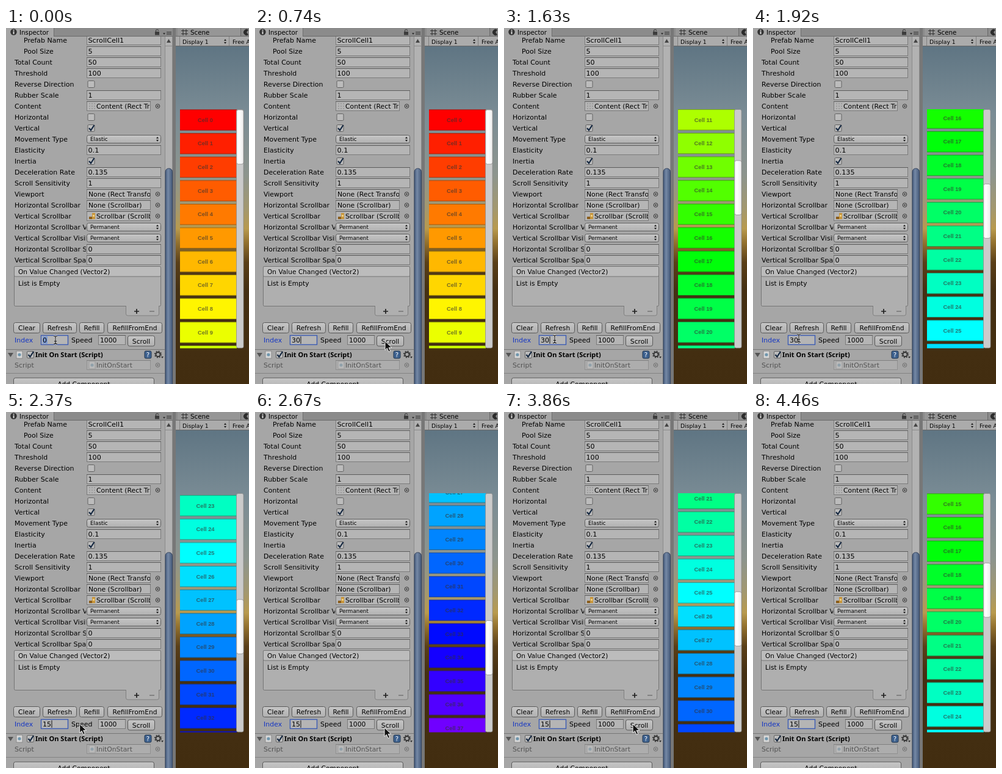
Recreate the animation shown at these times as an HTML page. Size 398 px wide and 583 px high, loop 4.91 s.

```html
<!DOCTYPE html>
<html lang="en">
<head>
<meta charset="utf-8">
<title>Inspector scroll</title>
<style>
html, body { margin: 0; width: 100%; height: 100%; overflow: hidden; background: #a6a6a6; }
svg { display: block; font: 11px "DejaVu Sans", sans-serif; }
text { white-space: pre; }
.bold { font: bold 11px "Noto Sans", sans-serif; }
.cell { font: bold 9.3px "Liberation Sans", Arial, sans-serif; fill: #323232; fill-opacity: .66; }
</style>
</head>
<body>
<svg id="stage" width="398" height="583" viewBox="0 0 398 583"></svg>
<script>
const LOOP = 4910, PITCH = 38.65, TOP = 133.5;
const stage = document.getElementById('stage');

const rect = (x, y, w, h, fill, more = '') =>
  `<rect x="${x}" y="${y}" width="${w}" height="${h}" fill="${fill}" ${more}/>`;
const path = (d, fill, more = '') => `<path d="${d}" fill="${fill}" ${more}/>`;
const line = (d, color, width = 1) =>
  path(d, 'none', `stroke="${color}" stroke-width="${width}"`);
const text = (x, y, s, size = 11, more = '') =>
  `<text x="${x}" y="${y}" font-size="${size}" ${more}>${s}</text>`;
const mid = 'text-anchor="middle"';

const field = (x, y, w, fill = '#b5b5b5') =>
  rect(x + .5, y - 7.5, w - 1, 15, fill, 'stroke="#7b7b7b"') +
  line(`M${x} ${y - 7.5}h${w}`, '#5c5c5c');
const button = (x, y, w, label, h = 17) =>
  rect(x + .5, y - h / 2, w - 1, h, 'url(#face)', 'rx="3" stroke="#5a5a5a"') +
  text(x + w / 2, y + 4, label, 10.7, mid);
const check = (x, y, on) =>
  rect(x - 5.5, y - 5.5, 11, 11, '#bcbcbc', 'rx="1.5" stroke="#626262"') +
  (on ? line(`M${x - 3.5} ${y}l3 3.5 5.5-8.5`, '#13263f', 2.2) : '');
const picker = (y, color = '#333') =>
  `<circle cx="248.5" cy="${y}" r="3.3" fill="none" stroke="${color}"/>` +
  `<circle cx="248.5" cy="${y}" r="1.2" fill="${color}"/>`;
const updown = (x, y) =>
  path(`M${x - 2} ${y - 1}l2-3 2 3zM${x - 2} ${y + 1}l2 3 2-3z`, '#222');
const popup = (y, s) =>
  rect(132.5, y - 6.5, 121, 13, 'url(#face)', 'rx="3" stroke="#5f5f5f"') +
  text(138, y + 3.2, s, 8.8) + updown(248, y);
const gridIcon = (x, y) => line(
  `M${x} ${y - 4}h10M${x} ${y}h10M${x} ${y + 4}h10`, '#858585') .replace('/>', ' stroke-dasharray="2 2"/>');
const barIcon = (x, y) =>
  rect(x, y + 1, 5, 4, '#8a5d1c') + rect(x + 5, y - 5, 5, 10, '#c8963c') +
  rect(x + 6, y - 2, 3, 3, '#f0d080');
const scriptIcon = (x, y, opacity) =>
  `<g opacity="${opacity}">` + rect(x, y - 6, 10, 12, '#d6d6d6', 'stroke="#8a8a8a"') +
  `<circle cx="${x + 5}" cy="${y}" r="2.6" fill="#6f96ad"/></g>`;

// label, kind, value
const rows = [
  ['Prefab Name', 'num', 'ScrollCell1'], ['Pool Size', 'num', '5'],
  ['Total Count', 'num', '50'], ['Threshold', 'num', '100'],
  ['Reverse Direction', 'check', false], ['Rubber Scale', 'num', '1'],
  ['Content', 'grid', 'Content (Rect Transform)'], ['Horizontal', 'check', false],
  ['Vertical', 'check', true], ['Movement Type', 'popup', 'Elastic'],
  ['Elasticity', 'num', '0.1'], ['Inertia', 'check', true],
  ['Deceleration Rate', 'num', '0.135'], ['Scroll Sensitivity', 'num', '1'],
  ['Viewport', 'obj', 'None (Rect Transform)'],
  ['Horizontal Scrollbar', 'obj', 'None (Scrollbar)'],
  ['Vertical Scrollbar', 'bar', 'Scrollbar (Scrollbar)'],
  ['Horizontal Scrollbar Visibility', 'popup', 'Permanent'],
  ['Vertical Scrollbar Visibility', 'popup', 'Permanent'],
  ['Horizontal Scrollbar Spacing', 'num', '0'],
  ['Vertical Scrollbar Spacing', 'num', '0']
];

function row([label, kind, value], i) {
  const y = 20 + 18 * i;
  let s = text(i < 2 ? 29 : 14, y + 4, label, 11, 'clip-path="url(#labels)"');
  if (kind === 'check') return s + check(139.5, y, value);
  if (kind === 'popup') return s + popup(y, value);
  if (kind === 'num') return s + field(132, y, 122) + text(134.5, y + 4, value, 11.2);
  const icon = { grid: gridIcon, bar: barIcon }[kind];
  return s + field(132, y, 105) + (icon ? icon(136, y) : '') +
    text(icon ? 148 : 135, y + 4, value, 10.8, 'clip-path="url(#values)"') + picker(y);
}

function rainbow(p) {
  const i = Math.floor(p * 6), f = p * 6 - i, q = 1 - f;
  const c = [[1, f, 0], [q, 1, 0], [0, 1, f], [0, q, 1], [f, 0, 1], [1, 0, q]][i % 6];
  return `rgb(${c.map(v => Math.round(v * 255))})`;
}

function cell(_, i) {
  const y = TOP + i * PITCH;
  return rect(285, y, 93, 34.2, rainbow(i / 50)) +
    line(`M285 ${y + .4}h93M285 ${y + 33.8}h93`, 'rgba(40,40,20,.45)', .9) +
    text(326.5, y + 20.3, 'Cell ' + i, 9.3, mid + ' class="cell"');
}

const defs = `<defs>
<clipPath id="labels"><rect width="131" height="583"/></clipPath>
<clipPath id="values"><rect x="132" width="104" height="583"/></clipPath>
<clipPath id="view"><rect x="285" y="133" width="93" height="391.5"/></clipPath>
<linearGradient id="face" x2="0" y2="1"><stop stop-color="#c6c6c6"/><stop offset="1" stop-color="#b0b0b0"/></linearGradient>
<linearGradient id="thumb"><stop stop-color="#465b7c"/><stop offset=".4" stop-color="#7488a5"/><stop offset="1" stop-color="#465a79"/></linearGradient>
<linearGradient id="knob"><stop stop-color="#e8e8e8"/><stop offset=".3" stop-color="#fff"/><stop offset="1" stop-color="#ededed"/></linearGradient>
<linearGradient id="sky" gradientUnits="userSpaceOnUse" x1="0" y1="30" x2="0" y2="583">
${[[0, '#5f7583'], [.2, '#7a8c95'], [.38, '#8d958e'], [.48, '#a3986f'], [.54, '#b89a4e'],
   [.58, '#94722f'], [.64, '#5a3f18'], [.72, '#453013'], [1, '#422d10']]
  .map(([o, c]) => `<stop offset="${o}" stop-color="${c}"/>`).join('')}
</linearGradient></defs>`;

const inspector =
  rect(0, 0, 274, 583, '#a6a6a6') + rows.map(row).join('') +
  rect(0, 0, 274, 13, '#8b8b8b') + rect(0, 0, 78, 14, '#a6a6a6') +
  line('M78 13.5H274', '#6a6a6a') + line('M78.5 0v13', '#6f6f6f') +
  '<circle cx="12.5" cy="6.5" r="5.2" fill="#333"/>' +
  rect(11.6, 5.4, 1.9, 4.6, '#ddd') + rect(11.6, 2.8, 1.9, 1.7, '#ddd') +
  text(22, 10.5, 'Inspector', 10.3) +
  rect(244, 6, 7, 5.5, '#3c3c3c') + line('M245.5 6v-1.5a2 2 0 0 1 4 0', '#3c3c3c', 1.2) +
  path('M257 8h4l-2 3z', '#333') + line('M263 6.5h8M263 8.5h8M263 10.5h8', '#444') +
  // event list
  rect(13.5, 390.5, 240, 65, '#afafaf', 'rx="2" stroke="#747474"') +
  rect(13.5, 390.5, 240, 16.5, '#bcbcbc', 'rx="2" stroke="#747474"') +
  text(20, 402.5, 'On Value Changed (Vector2)', 10.6) + text(20, 422, 'List is Empty', 10.7) +
  path('M196.5 456v12q0 3 3 3h48q3 0 3-3v-12z', '#afafaf', 'stroke="#808080"') +
  rect(197, 454, 53, 3, '#afafaf') +
  line('M210 464h8M214 460v8', '#222', 1.7) + line('M235 464h8', '#777', 1.6) +
  // actions
  button(12, 491, 44, 'Clear') + button(60, 491, 56, 'Refresh') +
  button(120, 491, 41, 'Refill') + button(166, 491, 90, 'RefillFromEnd') +
  text(14, 515, 'Index', 11, 'fill="#1536c4"') + text(107, 515, 'Speed') +
  field(151, 511, 45) + text(154, 515, '1000', 10.8) + button(199, 512.5, 45, 'Scroll') +
  rect(57.5, 503.5, 44, 15, '#b5b5b5', 'stroke="#3c5cb4" stroke-width="1.4"') +
  // script component
  line('M0 526.5H260', '#777') + path('M3 532h9l-4.500 7z', '#555') +
  scriptIcon(17, 535, 1) + check(40, 535, true) +
  text(48, 539, 'Init On Start (Script)', 11, 'class="bold"') +
  rect(227, 529, 11, 12, '#3d618f', 'rx="2" stroke="#23374f"') +
  text(232.5, 538.5, '?', 10, mid + ' fill="#fff"') +
  '<circle cx="249" cy="534.500" r="3.600" fill="none" stroke="#333" stroke-width="2"/>' +
  '<circle cx="249" cy="534.500" r="5.300" fill="none" stroke="#333" stroke-width="1.5" stroke-dasharray="2 2.160"/>' +
  path('M254 538h4l-2 3z', '#333') +
  '<g opacity=".5">' + text(14, 556, 'Script') + field(132, 552, 105) +
  scriptIcon(136, 552, .8) + text(148, 556, 'InitOnStart', 10.8) + picker(552) + '</g>' +
  line('M0 565.5H260', '#848484') + button(12, 583, 231, 'Add Component', 20) +
  // panel scrollbar
  rect(260, 14, 13, 569, '#b2b2b2') + line('M260.5 14V583M272.5 14V583', '#8a8a8a') +
  line('M260 29.5h13', '#8a8a8a') + path('M263 24h7l-3.500-6z', '#444') +
  rect(261, 230, 11.5, 370, 'url(#thumb)', 'rx="5.500" stroke="#33425c"');

const scene =
  rect(273, 0, 5, 583, '#777') + rect(278, 30, 120, 553, 'url(#sky)') +
  rect(278, 0, 120, 13, '#8b8b8b') + rect(281, 0, 103, 13, '#969696') +
  line('M278 13.5H398M384.5 0v13', '#686868') +
  line('M290 2v10M295 2v10M287 4.500h11M287 9.500h11', '#333', 1.1) +
  text(302, 10.5, 'Scene', 10.3) +
  path('M397 3a5 5 0 1 0 0 8l-3-4z', '#2c2c2c') +
  rect(278, 14, 120, 16, '#ababab') + line('M278 29.5H398', '#666') +
  line('M284.5 14v15M365.5 14v15', '#808080') +
  text(289, 25.5, 'Display 1', 9.2) + updown(359, 22) + text(371, 25.5, 'Free Aspect', 9.2) +
  `<g clip-path="url(#view)"><g id="list">${Array.from({ length: 50 }, cell).join('')}</g></g>` +
  rect(377.5, 133.5, 11.5, 390.5, '#cbcbcb', 'rx="2.500" stroke="#8c8c8c" stroke-width=".8"') +
  rect(377.5, 134, 11.5, 89, 'url(#knob)', 'id="bar" rx="3" stroke="#8f8f8f" stroke-width=".8"');

const overlay =
  rect(60, 505, 8, 12, '#7d9bd3', 'id="mark"') + text(60, 515, '', 11, 'id="index"') +
  rect(74.5, 505, 1, 12, '#111', 'id="caret"') +
  '<g id="beam">' + line('M-3-6.500q3 0 3 2v9q0 2-3 2M3-6.500q-3 0-3 2v9q0 2 3 2', '#e4e4e4', 2.4) +
  line('M-3-6.500q3 0 3 2v9q0 2-3 2M3-6.500q-3 0-3 2v9q0 2 3 2M-2 2h4', '#111', 1.1) + '</g>' +
  path('M0 0v14.500l3.400-3.200 2.600 6 2.700-1.200-2.600-5.700h4.900z', '#111', 'id="arrow" stroke="#f2f2f2"');

stage.innerHTML = defs + inspector + scene + overlay;
const [list, bar, mark, index, caret, beam, arrow] =
  ['list', 'bar', 'mark', 'index', 'caret', 'beam', 'arrow'].map(id => document.getElementById(id));

// tracks of [time, ...values]
const scroll = [[1000, 0], [1340, 229.4], [1920, 621.4], [2670, 1062.7], [2813, 1159.5],
  [3356, 1159.5], [3420, 1116.4], [3860, 820.7], [4219, 579.75]];
const mouse = [[0, 81, 511], [300, 81, 511], [740, 213, 513], [1040, 213, 513],
  [1340, 91, 511], [1920, 75, 508], [2220, 75, 508], [2670, 212, 517], [2970, 211, 511],
  [4160, 211, 511], [4310, 230, 560], [4460, 240, 610]];
// time, index text, selected
const typing = [[0, '0', true], [150, '30'], [2070, '30', true], [2220, '1'], [2370, '15']];

function at(track, t) {
  const n = track.findIndex(k => k[0] > t);
  if (n <= 0) return track.at(n).slice(1);
  const a = track[n - 1], b = track[n], f = (t - a[0]) / (b[0] - a[0]);
  return a.slice(1).map((v, i) => v + (b[i + 1] - v) * f);
}

const ticks = Array.from({ length: 31 }, (_, k) =>
  150 * k - 10 * [4, 9, 12, 23].filter(n => k > n).length);

const show = (el, on) => el.setAttribute('visibility', on ? 'visible' : 'hidden');

function draw(now) {
  const t = ticks.findLast(k => k <= now % LOOP);
  const [offset] = at(scroll, t), [x, y] = at(mouse, t);
  list.setAttribute('transform', `translate(0 ${-offset})`);
  bar.setAttribute('y', 134 + offset * .1953);

  const [, value, selected] = typing.findLast(k => k[0] <= t);
  const width = 7 * value.length;
  index.textContent = value;
  mark.setAttribute('width', width + 1);
  caret.setAttribute('x', 60.5 + width);
  show(mark, selected);
  show(caret, !selected);

  const inField = x > 57 && x < 101;
  for (const el of [beam, arrow]) el.setAttribute('transform', `translate(${x} ${y})`);
  show(beam, inField);
  show(arrow, !inField);
}

const start = performance.now();
function loop() {
  draw(performance.now() - start);
  requestAnimationFrame(loop);
}
loop();
</script>
</body>
</html>
```
